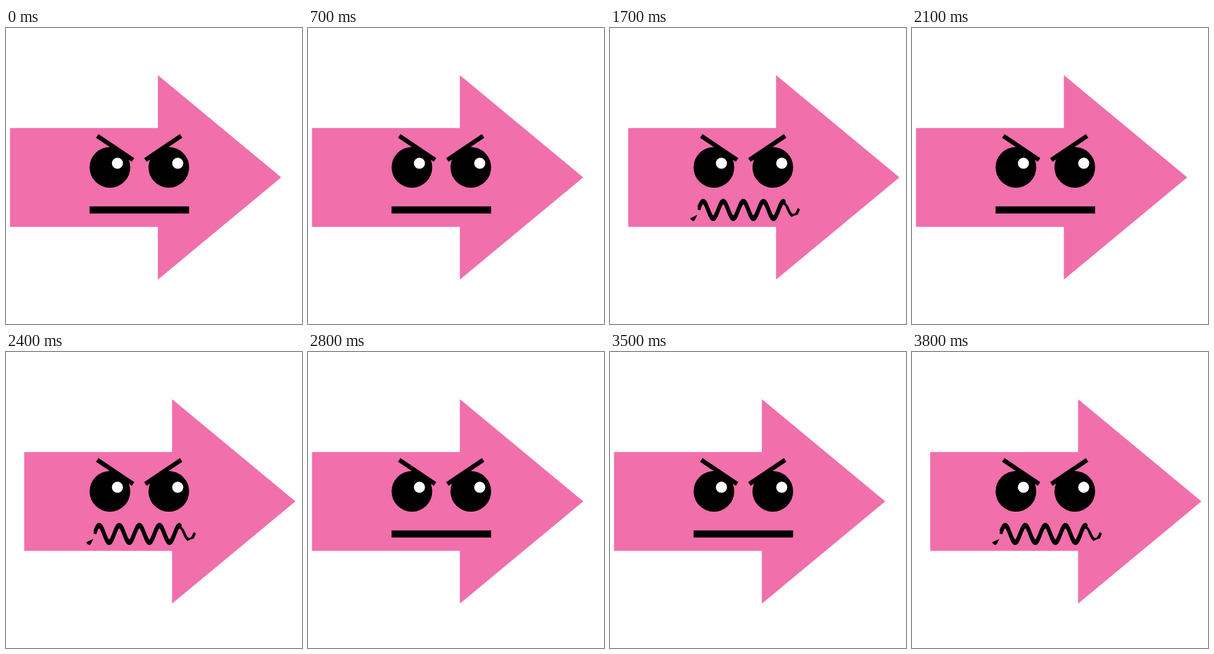
An HTML page that plays this animation: 480 px wide and 480 px high, repeating every 4200 ms.

```html
<!DOCTYPE html>
<html lang="en">
<head>
<meta charset="utf-8">
<title>Angry arrow</title>
<style>
  html, body { margin: 0; width: 100%; height: 100%; overflow: hidden; background: #fff; }
  svg { display: block; width: 100vw; height: 100vh; }
  .arrow { fill: #f16fab; animation: push 700ms step-end infinite; }
  .calm { animation: calm 700ms step-end infinite; }
  .grit { animation: grit 700ms step-end infinite; }
  .brow { fill: none; stroke: #000; stroke-width: 7.2; }
  .wave { fill: none; stroke: #000; stroke-width: 5; }
  .shine { fill: #fff; }
  /* 300 ms at rest, 400 ms pushed forward */
  @keyframes push { 0% { transform: translateX(0); } 42.857%, 100% { transform: translateX(23px); } }
  @keyframes calm { 0% { visibility: visible; } 42.857%, 100% { visibility: hidden; } }
  @keyframes grit { 0% { visibility: hidden; } 42.857%, 100% { visibility: visible; } }
</style>
</head>
<body>
<svg viewBox="0 0 480 480">
  <path class="arrow" d="M6.5 162.3H246.3V76.6L446.3 242.2L246.3 408V322.5H6.5Z"/>

  <circle cx="168.5" cy="226" r="33"/>
  <circle cx="264" cy="226" r="33"/>
  <circle class="shine" cx="180.7" cy="219.3" r="9"/>
  <circle class="shine" cx="278.5" cy="219.3" r="9"/>
  <path class="brow" d="M148 175L206 214M284 175L226 214"/>

  <rect class="calm" x="135.5" y="289.3" width="161.5" height="11.5"/>

  <g class="grit">
    <path id="wave" class="wave" d="M144 291q3.500-11.500 7-11.500
      c6 0 10.300 27 16.300 27s10.300-27 16.300-27s10.300 27 16.300 27s10.300-27 16.300-27
      s10.300 27 16.300 27s10.300-27 16.300-27s10.300 27 16.300 27s10.300-27 16.300-27"/>
    <use href="#wave" y="4"/>
    <path d="M280 277Q284 277 285 281L284.500 283Q288 287 290 291Q293 299 296 301.500
      Q299 302 301 299L304.500 292L308 294.500L304.500 302.500Q298 304 294.500 306.500
      Q290 303 287 295Q284 287 281 286Z"/>
    <path d="M130 308.500L141.500 303Q138 311 136.500 312.500Q133 314 130 308.500Z"/>
  </g>
</svg>
</body>
</html>
```
